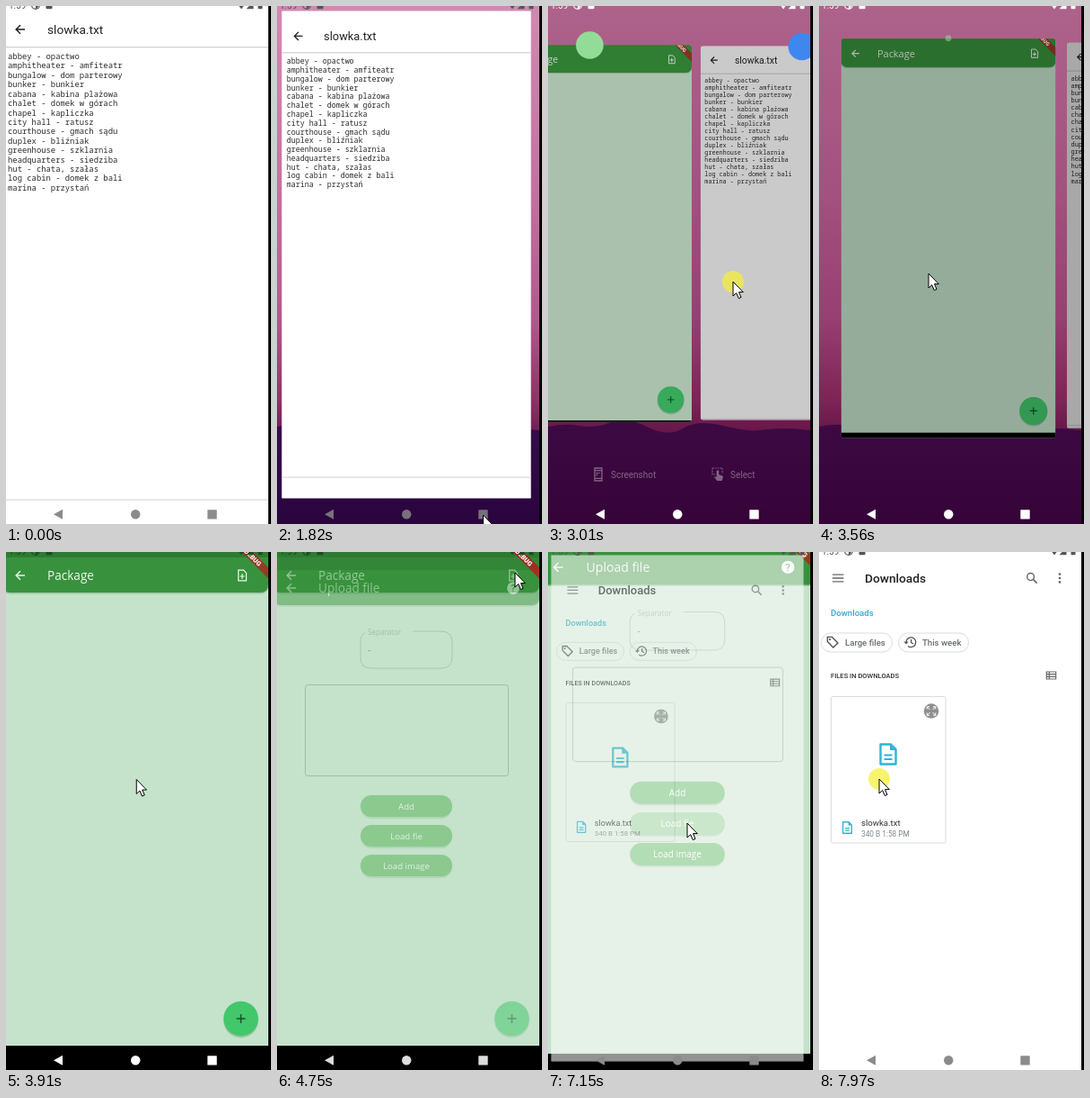
Write an HTML page that moves like this. It is 295 px wide and 575 px high and loops after 8 s.

```html
<!DOCTYPE html>
<html lang="en">
<head>
<meta charset="utf-8">
<title>Load a word list</title>
<style>
html, body { margin: 0; width: 100%; height: 100%; overflow: hidden; background: #000; }
svg { display: block; width: 295px; height: 575px; }
text { white-space: pre; }
.ro { font-family: Roboto, sans-serif; }
.md { font-family: Roboto, sans-serif; font-weight: 500; }
.os { font-family: "Open Sans", sans-serif; }
.mono { font-family: "Noto Sans Mono", monospace; font-size: 8.87px; }
.mid { text-anchor: middle; }
</style>
</head>
<body>
<svg id="stage" viewBox="0 0 295 575"></svg>
<script>
const LOOP = 8000;
const BODY = '#c5e2ca', BAR = '#38923d', BAR_TOP = '#2e7a33';
const words = ['abbey - opactwo', 'amphitheater - amfiteatr', 'bungalow - dom parterowy',
  'bunker - bunkier', 'cabana - kabina plażowa', 'chalet - domek w górach', 'chapel - kapliczka',
  'city hall - ratusz', 'courthouse - gmach sądu', 'duplex - bliźniak', 'greenhouse - szklarnia',
  'headquarters - siedziba', 'hut - chata, szałas', 'log cabin - domek z bali', 'marina - przystań'];

// Markup helpers
const rect = (x, y, w, h, fill, extra = '') =>
  `<rect x="${x}" y="${y}" width="${w}" height="${h}" fill="${fill}" ${extra}/>`;
const circle = (x, y, r, fill, extra = '') => `<circle cx="${x}" cy="${y}" r="${r}" fill="${fill}" ${extra}/>`;
const path = (d, fill, extra = '') => `<path d="${d}" fill="${fill}" ${extra}/>`;
const line = (d, color, w = 1.4, extra = '') => path(d, 'none', `stroke="${color}" stroke-width="${w}" ${extra}`);
const text = (x, y, size, str, fill, cls = 'ro') =>
  `<text x="${x}" y="${y}" font-size="${size}" fill="${fill}" class="${cls}">${str}</text>`;
const at = (x, y, body, s = 1) => `<g transform="translate(${x} ${y}) scale(${s})">${body}</g>`;

const backArrow = c => at(16, 26, line('M5 0H-4.4M0 -4.8L-4.8 0L0 4.8', c, 1.5));
const fileIcon = (x, y, s, c) => at(x, y,
  line('M-8.5 -11H3L8.5 -5.5V11H-8.5Z', c, 2.4, 'stroke-linejoin="round"') +
  path('M2 -11L8.5 -4.5H2Z', c) + line('M-4.5 1H4.5M-4.5 5.5H4.5', c, 2.2), s);
const banner = `<g transform="translate(292 -11) rotate(45)">
  ${rect(-30, 20, 60, 8.7, '#b71c1c', 'opacity=".72"')}
  <text y="26.9" font-size="7.2" font-weight="800" fill="#fff" class="ro mid">DEBUG</text></g>`;
const greenBar = title =>
  path('M-4 -12H292V36Q292 45 283 45H5Q-4 45 -4 36Z', '#1d5a24', 'opacity=".22" transform="translate(0 1.5)"') +
  path('M-4 -12H292V36Q292 45 283 45H5Q-4 45 -4 36Z', BAR) +
  rect(-4, -12, 296, 18, BAR_TOP) + backArrow('#e4f2e5') + text(46, 31, 13.6, title, '#eef8ee', 'os');
const pill = (y, label) =>
  rect(93, y - 11, 102, 25, '#2f7a35', 'rx="12.5" opacity=".25"') +
  rect(93, y - 12, 102, 24, '#4caf50', 'rx="12"') +
  text(144, y + 3.6, 9.6, label, '#fff', 'os mid');
const chip = (x, w, label, tx) =>
  rect(x, 90, w, 21, '#fff', 'rx="10.5" stroke="#dadce0"') + text(tx, 103.6, 9.6, label, '#6a6d71', 'md');

const viewer = rect(-4, -12, 296, 600, '#fff') + rect(-4, 45, 296, 1.4, '#d4d4d4') +
  backArrow('#222') + text(46, 31, 13.7, 'slowka.txt', '#222') +
  words.map((w, i) => text(2, 59 + i * 10.42, 8.87, w, '#2b2b2b', 'mono')).join('') +
  rect(-4, 547.6, 296, 1, '#d2d2d2');

const pack = rect(-4, -12, 296, 600, BODY) + greenBar('Package') +
  at(263, 26, line('M-4.3 -5.8H1.4L4.5 -2.6V5.8H-4.3ZM0 -2V4M-2.6 1H2.6', '#eef8ee', 1.2)) +
  circle(261.5, 520, 19.3, '#2a6b3c', 'opacity=".25"') + circle(261.5, 518, 19.3, '#42c76b') +
  line('M256.5 518H266.5M261.5 513V523', '#155227', 1.5) + banner + rect(-4, 548, 296, 40, '#000');

const upload = rect(-4, -12, 296, 600, BODY) + greenBar('Upload file') +
  circle(263, 26, 6.9, '#f2faf2') + text(263, 30, 11, '?', BAR, 'md mid') +
  line('M151 74H183Q195 74 195 86V103Q195 115 183 115H105Q93 115 93 103V86Q93 78 98 75.5', '#8ba892', 1) +
  text(101, 78, 8.1, 'Separator', '#7d9a85', 'os') + text(101, 97.5, 10, '-', '#3c4a40', 'os') +
  rect(31.5, 133.5, 226, 101, 'none', 'rx="3" stroke="#6f8d77" stroke-width=".9"') +
  pill(268, 'Add') + pill(301, 'Load fie') + pill(334, 'Load image') +
  rect(93, 289, 102, 24, '#fff', 'rx="12" id="ripple"');

const blue = '#2fb4d6', gray = '#666a6e';
const downloads = rect(-4, -12, 296, 592, '#fff') +
  line('M15 25.2H27.5M15 29H27.5M15 32.8H27.5', gray, 1.3) + text(51, 34, 13.7, 'Downloads', '#202124', 'md') +
  `<circle cx="235.6" cy="27.5" r="3.9" fill="none" stroke="${gray}" stroke-width="1.5"/>` +
  line('M238.5 30.4L242.6 34.6', gray, 1.7) +
  [24.6, 29, 33.4].map(y => circle(268, y, 1.35, gray)).join('') +
  text(13, 71, 9.6, 'Downloads', '#35a8d0', 'md') +
  chip(2.5, 79, 'Large files', 29) + chip(88.5, 78, 'This week', 115) +
  at(15, 100, line('M-5.6 -5.6H-.5L6 .9L.9 6L-5.6 -.5Z', '#50545a', 1.4) + circle(-2.9, -2.9, 1.1, '#50545a')) +
  at(102, 100, line('M-5 0A5.4 5.4 0 1 1 -3 4.4M.6 -3V.5L3 2', '#50545a', 1.3) + path('M-7.6 -.6H-2.4L-5 2.4Z', '#50545a')) +
  text(13, 139.8, 7.55, 'FILES IN DOWNLOADS', '#303236', 'md') +
  at(258.5, 137, line('M-5.2 -4H5.2V4H-5.2ZM-5.2 -1.3H5.2M-5.2 1.4H5.2M-2.2 -4V4', gray, 1.2)) +
  rect(13.5, 160.5, 127.5, 162.5, '#fff', 'rx="1.5" stroke="#dcdcdc"') +
  circle(125, 176.5, 8.3, '#8f8f8f') +
  at(125, 176.5, line('M-4.8 -2V-4.8H-2M2 -4.8H4.8V-2M4.8 2V4.8H2M-2 4.8H-4.8V2M-4.5 -4.5L-1.5 -1.5M4.5 -4.5L1.5 -1.5M4.5 4.5L1.5 1.5M-4.5 4.5L-1.5 1.5', '#fff', 1)) +
  fileIcon(77, 224.5, 1, blue) + fileIcon(31.5, 306, .57, blue) +
  text(47, 304.3, 9.6, 'slowka.txt', '#303236') + text(47, 315.8, 8.3, '340 B 1:58 PM', '#80868b');

const wallpaper = rect(0, 0, 292, 575, 'url(#sky)') +
  path('M0 467Q18 463 36 466T70 462T110 467T150 469T195 466T235 471T270 469L292 471V575H0Z', 'url(#hill)');

const labels = at(56, 520, line('M-4 -7H4V7H-4ZM-4 -4.4H4M-4 4.4H4', '#fff', 1.3) + line('M-1.8 1.8V-1.8H1.8', '#fff', 1.1)) +
  text(70, 523.6, 10, 'Screenshot', '#fff') +
  at(189, 519, line('M-6 -6H5M-6 -6V1H-3M5 -6V0', '#fff', 1.2, 'stroke-dasharray="1.6 1.2"') +
    path('M-1.4 -3Q0 -4.4 1.2 -3V1L6 3L4.8 8H-.8L-4.4 3.4L-1.4 4Z', '#fff')) +
  text(203, 523.6, 10, 'Select', '#fff');

const status = `<text x="3" y="3.2" font-size="10" class="ro">1:59</text>` +
  `<circle cx="33" cy="-1" r="4.4" fill="none" stroke="currentColor" stroke-width="1.2"/>` +
  path('M33 -5A4.4 4.4 0 0 1 33 3.4Z', 'currentColor') +
  rect(44.5, -5, 7, 8.2, 'currentColor', 'rx="1"') + path('M257 -3H267L262 3.4Z', 'currentColor') +
  path('M275.5 -5V3.2H267.5Z', 'currentColor') + rect(280.5, -6, 5, 9.2, 'currentColor', 'rx=".8"');

const nav = path('M53 564.3L63 558.8V569.8Z', 'currentColor') + circle(144.2, 564.3, 5.2, 'currentColor') +
  rect(224.3, 559.2, 10.4, 10.4, 'currentColor', 'rx=".6"');

const card = (id, body) => `<clipPath id="${id}Clip"><rect id="${id}Rect" x="-4" width="296" rx="5"/></clipPath>
  <g id="${id}"><g clip-path="url(#${id}Clip)">${body}${rect(-4, -12, 296, 600, '#000', `id="${id}Dim"`)}</g></g>`;
const stops = list => list.map(([o, c]) => `<stop offset="${o}" stop-color="${c}"/>`).join('');
const gradient = (id, list) => `<linearGradient id="${id}" x2="0" y2="1">${stops(list)}</linearGradient>`;

document.getElementById('stage').innerHTML = `<defs>
  ${gradient('sky', [[0, '#de97bd'], [.35, '#d07dac'], [.6, '#bc6297'], [.76, '#96386c'], [.83, '#6e2058']])}
  ${gradient('hill', [[0, '#330f50'], [1, '#27053f']])}</defs>
  ${wallpaper}${rect(0, 0, 292, 575, '#50002c', 'id="scrim"')}
  <g id="labels">${labels}</g>
  ${card('viewer', viewer)}${card('pack', pack)}
  ${circle(0, 0, 1, '#3f87ee', 'id="fileDot"')}${circle(0, 0, 1, '#93dc98', 'id="packDot"')}
  <g id="app"><g id="upload">${upload}</g>${banner}${rect(-4, 548, 296, 40, '#000')}</g>
  <g id="downloads">${downloads}</g>
  <g id="status" fill="currentColor">${status}</g><g id="nav">${nav}</g>
  <g id="cursor">${circle(0, 0, 12, '#f6f038', 'id="press" opacity=".72"')}
  ${path('M0 0V16L3.7 12.6L6.3 18.6L9 17.4L6.5 11.6H11.3Z', '#fff', 'stroke="#000" stroke-width="1" stroke-linejoin="round"')}</g>
  ${rect(292, 0, 3, 575, '#000')}`;

const el = {};
document.querySelectorAll('[id]').forEach(n => el[n.id] = n);
const set = (id, attrs) => { for (const k in attrs) el[id].setAttribute(k, attrs[k]); };
const show = (id, on) => { el[id].style.display = on ? '' : 'none'; };

// Timing helpers
const clamp = v => Math.min(1, Math.max(0, v));
const ramp = (t, a, b) => clamp((t - a) / (b - a));
const smooth = (t, a, b) => { const u = ramp(t, a, b); return u * u * (3 - 2 * u); };
const bezier = (x1, y1, x2, y2) => x => {
  const f = (a, b, s) => 3 * a * s * (1 - s) ** 2 + 3 * b * s * s * (1 - s) + s ** 3;
  let lo = 0, hi = 1;
  for (let i = 0; i < 20; i++) { const m = (lo + hi) / 2; f(x1, x2, m) < x ? lo = m : hi = m; }
  return f(y1, y2, lo);
};
const fastOut = bezier(.4, 0, .2, 1), easeIn = bezier(.42, 0, 1, 1);
const track = (keys, t) => {
  const i = keys.findIndex(k => k[0] > t);
  if (i < 1) return (i ? keys[keys.length - 1] : keys[0]).slice(1);
  const a = keys[i - 1], b = keys[i], u = smooth(t, a[0], b[0]);
  return a.slice(1).map((v, j) => v + (b[j + 1] - v) * u);
};

const pointer = [[389, 262, 590], [390, 261, 571], [460, 254, 565], [530, 242, 562], [670, 229, 566],
  [939, 229, 566], [940, 229.5, 565], [1900, 229.5, 565], [2550, 68, 306], [2640, 68, 306],
  [3010, 206, 306], [3080, 214, 306], [3180, 214, 306], [3430, 122, 297], [3750, 122, 297],
  [4380, 265, 23], [4850, 265, 23], [5590, 152, 309], [5930, 155, 301], [7400, 155, 301],
  [7500, 142, 281], [7640, 67, 252]];
const scrolling = [[2640, 0], [3010, .587], [3080, .62], [3350, 1]];
const presses = [[1470, 1620], [2600, 3090], [3440, 3530], [4400, 4550], [6730, 6880], [7970, 8000]];

const scaleOf = p => 1 - .237 * p;
const zoom = (s, x, y) => `translate(${x * (1 - s)} ${y * (1 - s)}) scale(${s})`;

// p: 0 is full screen, 1 is a settled overview card; dx is the distance from centre
function placeCard(id, p, dx, extraDim = 0) {
  const s = scaleOf(p), top = -4 + 9.5 * ramp(p, .25, .8), y = 40.3 * p - 8 * p * (1 - p);
  set(id, { transform: `translate(${144 * (1 - s) + dx} ${y}) scale(${s})` });
  set(id + 'Rect', { y: p ? top : -12, height: p ? 581.5 - 32 * p - top : 600, rx: 4 * p });
  set(id + 'Dim', { opacity: Math.min(.4, Math.abs(dx) * .0015 * p + extraDim) });
}

function draw(t) {
  const enter = smooth(t, 1610, 2240), launch = smooth(t, 3460, 3850);
  const scroll = track(scrolling, t)[0];
  const packP = .98 * enter * (1 - launch), viewP = enter * (1 - launch / 2);
  const pitch = 296 * scaleOf(packP) + 9;
  const viewX = pitch * scroll, packX = pitch * (scroll - 1);

  show('viewer', launch < 1);
  show('pack', enter > 0 && t < 4860);
  placeCard('viewer', viewP, viewX);
  placeCard('pack', packP, packX, .24 * smooth(t, 3400, 3480) * (1 - smooth(t, 3600, 3850)));
  set('scrim', { opacity: .35 * enter });

  const icons = smooth(t, 2170, 2400), gone = ramp(t, 3460, 3590);
  const dot = { r: 15.3 * icons * (1 - gone), opacity: 1 - .6 * gone };
  set('fileDot', { cx: 144 + viewX, cy: 45, ...dot });
  set('packDot', { cx: 144 + packX, cy: 43.5 - 10 * gone, ...dot });
  const off = Math.min(scroll, 1 - scroll) * pitch;
  set('labels', { opacity: .9 * smooth(t, 2240, 2480) * (1 - ramp(off, 0, 165)) * (1 - ramp(t, 3440, 3540)) });

  const u = ramp(t, 4560, 4860), v = ramp(t, 7010, 7410), open = 1 - (1 - v) ** 2.5;
  show('app', u > 0 && v < 1);
  set('app', { transform: zoom(1 + .052 * open, 144, 290) });
  set('upload', { opacity: easeIn(u), transform: `translate(0 ${144 * (1 - fastOut(u))})` });
  set('ripple', { opacity: .3 * ramp(t, 6730, 6900) });
  show('downloads', v > 0);
  set('downloads', { opacity: ramp(t, 7010, 7255), transform: zoom(.85 + .15 * open, 143.5, 294) });

  const overview = t > 1900 && t < 3800;
  set('status', { color: overview ? '#fff' : t > 3800 && t < 7150 ? '#1f4a23' : '#555' });
  set('nav', { color: t > 1900 && t < 7100 ? (t > 4700 ? '#dcdcdc' : '#fff') : t > 1600 && t < 2000 ? '#77727a' : '#8b8b8b' });

  const [x, y] = track(pointer, t);
  set('cursor', { transform: `translate(${x} ${y})` });
  show('press', presses.some(([a, b]) => t >= a && t < b));
}

const start = performance.now();
function tick() {
  draw((performance.now() - start) % LOOP);
  requestAnimationFrame(tick);
}
tick();
</script>
</body>
</html>
```
